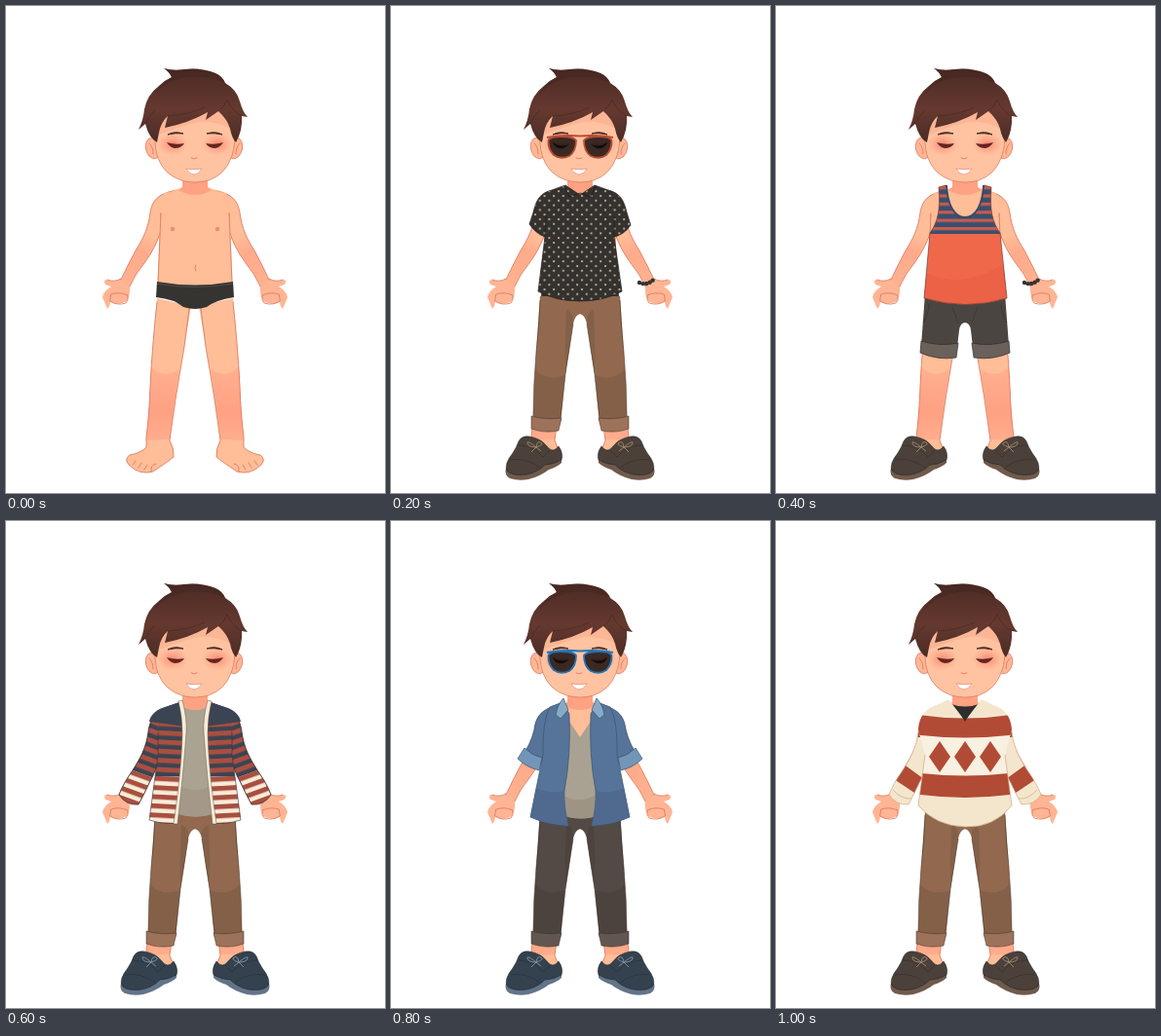
Write an HTML page that moves like this. It is 389 px wide and 500 px high and loops after 1.2 s.

```html
<!DOCTYPE html>
<html lang="en">
<head>
<meta charset="utf-8">
<title>Wardrobe</title>
<style>
html, body { margin: 0; width: 100%; height: 100%; overflow: hidden; background: #fff; }
svg { display: block; width: 100%; height: 100%; }
[data-on] { display: none; }
.line { fill: none; stroke: #d8745a; stroke-width: .8; stroke-linecap: round; }
</style>
</head>
<body>
<svg viewBox="0 0 389 500" stroke-linejoin="round">
<defs>
  <linearGradient id="armTone" gradientUnits="userSpaceOnUse" x1="150" y1="236" x2="118" y2="292">
    <stop stop-color="#ffbd98"/><stop offset=".3" stop-color="#ffab8b"/><stop offset="1" stop-color="#ffb391"/>
  </linearGradient>
  <linearGradient id="shinTone" gradientUnits="userSpaceOnUse" x1="0" y1="365" x2="0" y2="452">
    <stop stop-color="#ffb291"/><stop offset=".6" stop-color="#ffa183"/><stop offset="1" stop-color="#ffb08f"/>
  </linearGradient>
  <linearGradient id="hairTone" x1="0" y1="0" x2="0" y2="1">
    <stop stop-color="#4a2a24"/><stop offset=".55" stop-color="#65392f"/><stop offset="1" stop-color="#4b2c26"/>
  </linearGradient>
  <linearGradient id="knitTone" gradientUnits="userSpaceOnUse" x1="0" y1="262" x2="0" y2="263">
    <stop stop-color="#3b4452"/><stop offset="1" stop-color="#f7ecd8"/>
  </linearGradient>
  <linearGradient id="knitArm" href="#knitTone" gradientTransform="rotate(20 148 262)"/>
  <radialGradient id="blush">
    <stop stop-color="#f4685a" stop-opacity=".65"/><stop offset="1" stop-color="#ff8a72" stop-opacity="0"/>
  </radialGradient>
  <pattern id="dots" width="9.6" height="9.6" patternUnits="userSpaceOnUse" x="2" y="1">
    <g fill="#c9baa6"><circle cx="2" cy="2" r="1.1"/><circle cx="6.8" cy="6.8" r="1.1"/></g>
  </pattern>
  <pattern id="rows" width="10" height="9.4" patternUnits="userSpaceOnUse" y="206" patternTransform="rotate(3 165 240)">
    <path d="M0 0H10V5H0Z" fill="#a94f40"/>
  </pattern>
  <pattern id="armRows" href="#rows" patternTransform="rotate(20 148 262)"/>
  <pattern id="tankRows" width="10" height="8.4" patternUnits="userSpaceOnUse" y="185">
    <path d="M0 0H10V8.4H0Z" fill="#38506f"/><path d="M0 0H10V3.2H0Z" fill="#c75b4d"/>
  </pattern>
  <path id="sleeve" d="M172 189C158 193 148 199 146 217C144 232 138 244 130 256Q120 270 116 281Q123 292 136 291Q142 280 147 269Q155 255 158 238Z"/>
  <path id="shirt" d="M179 184L165 189C153 192 149 199 146 212L142 224Q149 234 158 237L151 293Q169 303 194 303T237 293L229 237Q239 235 246 225L242 212C239 199 235 192 223 189L209 184L194 194Z"/>
  <path id="front" d="M178 186L163 192Q155 206 156 240L147 307Q161 312 175 311Q181 250 184 215Z"/>
  <path id="tank" d="M167 186L175 184C176 204 183 217 194 217S212 204 213 184L221 186C219 209 222 222 230 233L237 300Q195 313 152 300L158 233C166 222 169 209 167 186Z"/>
  <path id="jumper" d="M177 183L165 189C155 192 147 199 146 214L153 240L146 292Q164 313 194 314T242 292L235 240L242 214C241 199 233 192 223 189L211 183L194 205Z"/>
  <clipPath id="sleeveClip"><use href="#sleeve"/></clipPath>
  <clipPath id="tankClip"><use href="#tank"/></clipPath>
  <clipPath id="jumperClip"><use href="#jumper"/></clipPath>

  <g id="limbs">
    <path d="M118 280Q111 284 104 281Q99 281 102 286L108 288Q100 293 99 299L104 311Q107 308 107 304Q116 308 124 303Q128 296 127 287Z" fill="#ffb594"/>
    <path class="line" d="M118 280Q111 284 104 281M108 296Q116 293 125 297Q126 302 123 305Q114 308 107 303Z"/>
    <path d="M180 187C162 191 151 194 148 212C146 229 140 240 133 251Q124 268 118 281Q121 288 127 288Q132 276 142 264Q155 246 160 229Z" fill="url(#armTone)"/>
    <path class="line" d="M172 190C156 193 150 200 148 212C146 229 140 240 133 251Q124 268 118 281M127 288Q132 276 142 264Q154 248 159 230V213"/>
    <path d="M155 300Q150 350 148 390Q147 420 144 442V453Q138 459 127 461Q121 465 126 471Q137 482 151 478Q166 468 172 463Q173 455 168 446Q174 400 183 350L190 308Z" fill="#ffbd98"/>
    <path d="M149 370Q161 384 178 373Q172 411 168 445L144 446Q148 408 149 370Z" fill="url(#shinTone)"/>
    <path class="line" d="M155 304Q150 350 148 390Q147 420 144 442V453Q138 459 127 461Q121 465 126 471Q137 482 151 478Q166 468 172 463Q173 455 168 446Q174 400 183 350L188 311M130 471l3-4M136 474l3-5M142 476l3-5M149 478q-1-7 5-8"/>
  </g>
  <g id="trouser">
    <path d="M153 298H194.500V316Q189 317 187 326L179 378L174 428L146 425Q146 390 149 355Z" fill="var(--cloth)"/>
    <path d="M148 373Q160 386 179 379L174 428L146 425ZM180 312Q188 314 187 326L179 379Q178 345 180 312Z" fill="#000" opacity=".09"/>
    <path d="M144 421Q158 425 175 423L172 436Q157 439 144 434Z" fill="var(--cuff)" stroke="#3d3027" stroke-width=".5"/>
    <path d="M153 302Q152 330 149 355Q146 390 146 421M187 326L179 378L174 423" fill="none" stroke="#3d3027" stroke-width=".5"/>
  </g>
  <g id="shoe">
    <path d="M118 474Q116 482 122 485Q131 488 141 486Q153 483 162 476Q171 473 175 469V460L145 470Z" fill="var(--sole)"/>
    <path d="M131 447Q134 441 142 442Q154 444 160 452Q166 460 172 452Q177 459 175 466Q166 471 158 471Q150 479 139 481Q124 483 119 477Q116 470 125 459Q129 453 131 447Z" fill="var(--shoe)" stroke="#24272b" stroke-width=".6"/>
    <path d="M130 451Q146 451 156 463Q160 460 163 456M121 466Q139 463 153 474" fill="none" stroke="#222" stroke-opacity=".45" stroke-width=".8"/>
    <path d="M149 453Q139 445 140 449T149 453Q158 450 154 448T149 453L144 458M149 453L154 457" fill="none" stroke="var(--lace)" stroke-width=".9"/>
  </g>
  <g id="shortLeg">
    <path d="M153 295H194.500V325Q189 325 188 333L186 350L149 349Z" fill="#4b4541"/>
    <path d="M149 344Q168 350 187 346L185 361Q166 364 148 356Z" fill="#69615a" stroke="#332f2c" stroke-width=".7"/>
    <path d="M157 306Q156 319 151 325M181 309L187 325" fill="none" stroke="#332f2c" stroke-width=".6"/>
  </g>
  <g id="cardigan">
    <g stroke="#38353a" stroke-width=".6">
      <use href="#sleeve" fill="url(#knitArm)"/><use href="#sleeve" fill="url(#armRows)"/>
    </g>
    <use href="#front" fill="url(#knitTone)"/><use href="#front" fill="url(#rows)"/>
    <path d="M178 186L163 191C153 194 148 200 147 206L184 211Z" fill="#3b4452"/>
    <path d="M156 240L147 307Q161 312 175 311M156 240V217" fill="none" stroke="#38353a" stroke-width=".6"/>
    <path d="M177 185L181 184Q186 203 185 217Q182 260 176 311H172Q180 257 181 218Q181 201 177 185Z" fill="#f7ecd8" stroke="#6a5b50" stroke-width=".5"/>
  </g>
  <g id="denim" stroke="#3c536f" stroke-width=".7">
    <path d="M177 187C158 192 149 197 147 214Q143 230 134 242L152 252Q158 242 160 222Z" fill="#567399"/>
    <path d="M176 186L163 191Q155 207 156 240L143 304Q161 312 182 313Q177 292 178 277Q185 240 183 198Z" fill="#567399"/>
    <path d="M149 274Q163 281 178 277Q177 292 182 313Q161 312 143 304Z" fill="#4f698f" stroke="none"/>
    <path d="M137 233Q145 241 155 243L152 256Q139 253 130 244Z" fill="#7395b8"/>
    <path d="M177 182Q171 188 169 199L174 203L182 194Z" fill="#86abc9"/>
  </g>
  <g id="knitSleeve">
    <use href="#sleeve" fill="#f3e6cc"/>
    <g clip-path="url(#sleeveClip)" fill="#b14b36">
      <path d="M130 249L152 265L145 281L121 265ZM140 198H180V222H140Z"/>
    </g>
    <use href="#sleeve" fill="none" stroke="#cfa982" stroke-width=".7"/>
    <path d="M120 276Q129 286 139 285" fill="none" stroke="#cfb38f" stroke-width=".8"/>
  </g>
  <g id="lens">
    <path d="M161.500 138Q163 134 175 134Q187 134 190 138Q190 149 183 154Q174 158 167 153Q161 147 161.500 138Z" fill="#30211d" fill-opacity=".95" stroke="var(--frame)" stroke-width="1.800"/>
    <path d="M160 135Q176 132 194 133.500" fill="none" stroke="var(--frame)" stroke-width="2"/>
    <path d="M166 140Q174 146 183 142Q178 147 172 146Q168 145 166 140Z" fill="#110d0d"/>
  </g>
  <g id="eye">
    <ellipse cx="171" cy="142" rx="16" ry="12" fill="url(#blush)"/>
    <path d="M166 132Q173 128 182 131Q174 130 166 132Z" fill="#4d2923" stroke="#4d2923" stroke-width="1"/>
    <path d="M165 140Q174 143 183 141Q180 146 173 146Q168 145 165 140Z" fill="#65251f"/>
  </g>
</defs>

<!-- body -->
<use href="#limbs"/><use href="#limbs" class="flip"/>
<path d="M181 174H207V186Q214 190 226 192L230 222L233 295Q194 310 155 295L158 222L162 192Q175 190 181 186Z" fill="#ffbd98"/>
<path d="M181 177H207V186L211 189Q194 199 177 189L181 186Z" fill="#ffa183"/>
<path class="line" d="M159 213L156 284M229 213L232 284M194.500 266Q193 269 195 272"/>
<g fill="#ed8c70"><circle cx="171" cy="229" r="2.200"/><circle cx="217" cy="229" r="2.200"/></g>
<path d="M155 283Q194 290 233 283L234 299Q215 302 206 309Q194 313 182 309Q173 301 154 299Z" fill="#353431"/>
<path d="M155 285Q194 292 233 285" fill="none" stroke="#55534e" stroke-width=".8"/>

<!-- bottoms and shoes -->
<g data-on="135" style="--cloth:#92694f;--cuff:#9c725a"><use href="#trouser"/><use href="#trouser" class="flip"/></g>
<g data-on="4" style="--cloth:#534a45;--cuff:#615650"><use href="#trouser"/><use href="#trouser" class="flip"/></g>
<g data-on="2"><use href="#shortLeg"/><use href="#shortLeg" class="flip"/></g>
<g data-on="125" style="--shoe:#4b413a;--sole:#705a4b;--lace:#a48a70"><use href="#shoe"/><use href="#shoe" class="flip"/></g>
<g data-on="34" style="--shoe:#34424f;--sole:#62748a;--lace:#8495a6"><use href="#shoe"/><use href="#shoe" class="flip"/></g>

<!-- dotted shirt -->
<g data-on="1">
  <use href="#shirt" fill="#34312e"/>
  <use href="#shirt" fill="url(#dots)" stroke="#24211f" stroke-width=".7"/>
  <path d="M158 237L159 215M229 237V215M178 185L183 196L194 192L205 196L210 185" fill="none" stroke="#211f1d" stroke-width=".8"/>
</g>

<!-- striped tank top -->
<g data-on="2">
  <use href="#tank" fill="#f0684a"/>
  <g clip-path="url(#tankClip)">
    <path d="M150 183H240V234H150Z" fill="url(#tankRows)"/>
    <path d="M150 272Q190 294 238 262V315H150Z" fill="#e75d42" opacity=".5"/>
  </g>
  <use href="#tank" fill="none" stroke="#793d3c" stroke-width=".7"/>
  <path d="M175 184C176 204 183 217 194 217S212 204 213 184" fill="none" stroke="#364a67" stroke-width="1.800"/>
</g>

<!-- cardigan -->
<g data-on="3">
  <path d="M179 190Q194 198 209 190L214 300Q195 307 174 300Z" fill="#aaa392"/>
  <path d="M179 272Q197 281 212 270L214 300Q195 307 174 300Z" fill="#a39888" opacity=".8"/>
  <use href="#cardigan"/><use href="#cardigan" class="flip"/>
</g>

<!-- open denim shirt -->
<g data-on="4">
  <path d="M178 194L184 207L194 222L204 207L210 194L216 301Q195 310 173 301Z" fill="#a9a292"/>
  <path d="M176 281Q195 293 215 278L216 301Q195 310 173 301Z" fill="#988b7c" opacity=".6"/>
  <use href="#denim"/><use href="#denim" class="flip"/>
</g>

<!-- jumper -->
<g data-on="5">
  <path d="M180 188Q194 193 208 188L194 210Z" fill="#302e2d"/>
  <use href="#knitSleeve"/><use href="#knitSleeve" class="flip"/>
  <use href="#jumper" fill="#f3e6cc"/>
  <g clip-path="url(#jumperClip)">
    <path d="M140 220H250V262H140Z" fill="#f8f0e0"/>
    <path d="M140 198Q194 207 248 198V219Q194 226 140 219ZM140 258Q194 265 248 258V280Q194 288 140 280ZM157 242l11-16 11 16-11 16ZM183 242l11-16 11 16-11 16ZM209 242l11-16 11 16-11 16Z" fill="#b14b36"/>
  </g>
  <path d="M184 190Q194 194 204 190L194 206Z" fill="#302e2d"/>
  <path d="M153 240L146 292Q164 313 194 314T242 292L235 240" fill="none" stroke="#cfa982" stroke-width=".7"/>
</g>

<!-- bracelet -->
<path data-on="12" d="M255 284Q264 288 271 279" fill="none" stroke="#393331" stroke-width="4.400" stroke-linecap="round" stroke-dasharray="0 3.700"/>

<!-- head -->
<g fill="#ffb795" stroke="#d8745a" stroke-width=".7">
  <ellipse cx="151" cy="146" rx="7.500" ry="11" transform="rotate(-14 151 146)"/>
  <ellipse cx="235" cy="146" rx="7.500" ry="11" transform="rotate(14 235 146)"/>
  <path d="M152 100Q151 143 156 156Q162 173 180 179Q194 183 208 179Q225 173 231 156Q237 143 235 100Z" fill="#ffc3a1"/>
</g>
<path class="line" d="M147 141Q151 144 151 152M240 141Q236 144 236 152M190 156Q193 158 196 156"/>
<path d="M157 108H231V126Q210 116 194 120T157 132Z" fill="#f8a98a" opacity=".5"/>
<use href="#eye"/><use href="#eye" class="flip"/>
<path d="M185 167Q193 168.500 201 167Q198 173 193 173Q188 173 185 167Z" fill="#fff" stroke="#dc735f" stroke-width=".6"/>
<path d="M162 64Q172 67 183 65Q200 63 215 69Q222 72 225 79Q237 86 240 98Q243 109 248 114L242 113Q243 128 236 140Q232 136 230 126Q227 116 218 108L205 117L207 109Q188 120 163 125L166 113Q159 119 157 130L155 140Q147 136 143 121L136 127Q141 117 142 106Q145 91 157 82Q163 76 170 73Q167 67 162 64Z" fill="url(#hairTone)"/>
<path d="M166 113Q186 112 204 104M218 108Q224 104 227 96Q232 108 242 113M143 121Q146 113 153 107" fill="none" stroke="#3d221e" stroke-width=".9" opacity=".5"/>
<path d="M162 64Q172 67 183 65Q200 63 215 69Q222 72 225 79Q206 71 188 73Q166 75 152 91Q156 82 170 73Q167 67 162 64Z" fill="#442620" opacity=".5"/>

<g data-on="1" style="--frame:#b94c35"><use href="#lens"/><use href="#lens" class="flip"/></g>
<g data-on="4" style="--frame:#2172b5"><use href="#lens"/><use href="#lens" class="flip"/></g>
</svg>
<script>
const STEP = 200, LOOKS = 6;
const layers = document.querySelectorAll('[data-on]');

for (const half of document.querySelectorAll('.flip'))
  half.setAttribute('transform', 'translate(388 0) scale(-1 1)');

const start = performance.now();
function draw(now) {
  const look = Math.floor(Math.max(0, now - start) / STEP) % LOOKS;
  for (const layer of layers)
    layer.style.display = layer.dataset.on.includes(look) ? 'inline' : 'none';
  requestAnimationFrame(draw);
}
draw(start);
</script>
</body>
</html>
```
